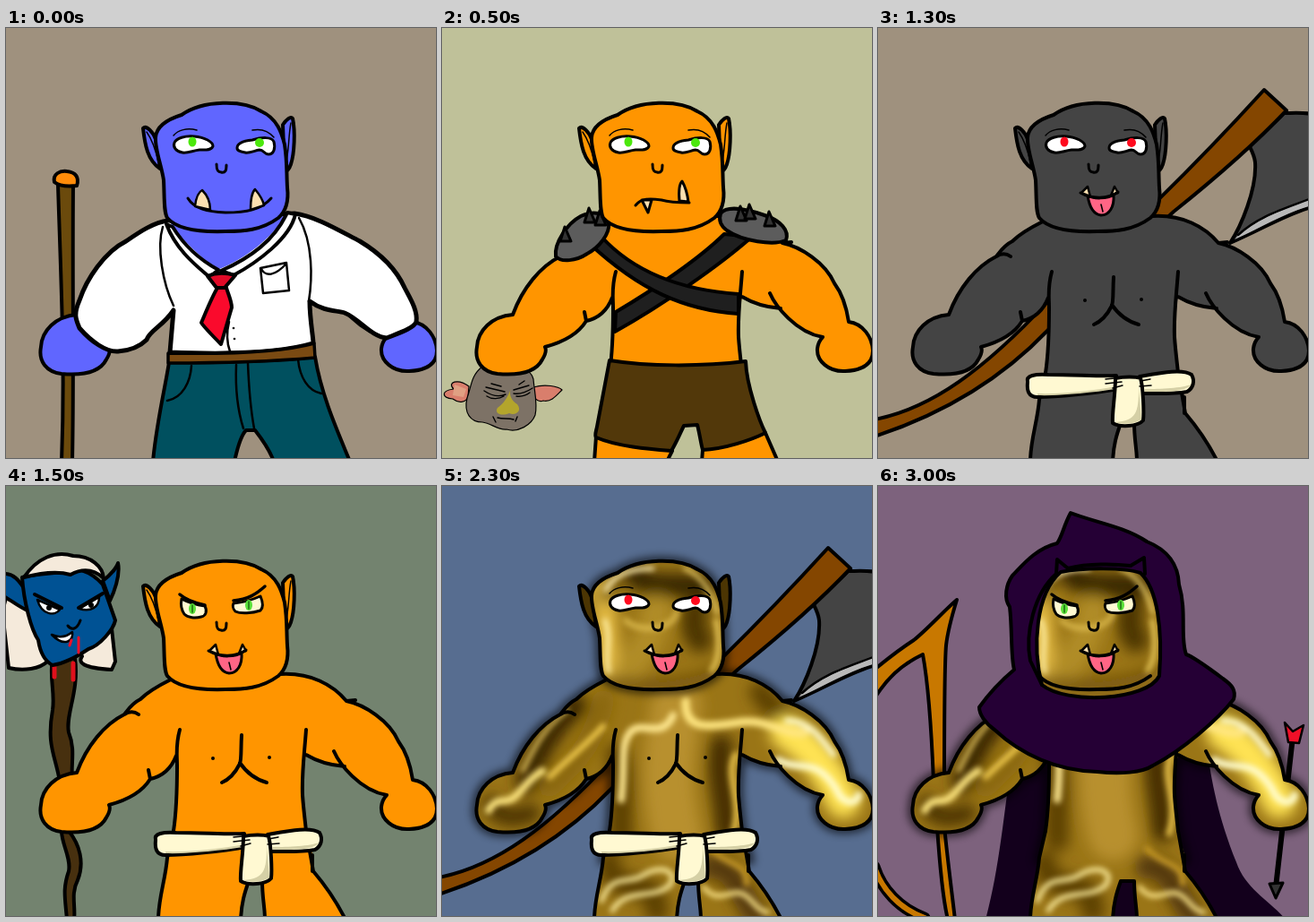
These frames come from a looping animation (480 by 480 pixels, 3.5 s). An HTML page:

```html
<!DOCTYPE html>
<html lang="en">
<head>
<meta charset="utf-8">
<title>Trolls</title>
<style>
html, body { margin: 0; width: 100%; height: 100%; overflow: hidden; }
svg { display: block; width: 100vw; height: 100vh; }
path, ellipse { stroke-linejoin: round; stroke-linecap: round; }
</style>
</head>
<body>
<svg id="stage" viewBox="0 0 480 480"></svg>
<script>
const INK = '#000', CREAM = '#fff9d2', BONE = '#fce0b0';
const shape = (d, fill, w = 4) => `<path d="${d}" fill="${fill}" stroke="${INK}" stroke-width="${w}"/>`;
const plain = (d, fill) => `<path d="${d}" fill="${fill}"/>`;
const line = (d, w = 4, color = INK) => `<path d="${d}" fill="none" stroke="${color}" stroke-width="${w}"/>`;
const dot = (x, y, rx, ry, fill) => `<ellipse cx="${x}" cy="${y}" rx="${rx}" ry="${ry}" fill="${fill}"/>`;

// Body outlines
const HEAD = 'M196 97C220 80 265 80 285 93C303 101 308 118 311 130C314 150 313 160 314 178C316 195 312 205 304 212C285 226 265 227 245 227C215 228 190 224 180 212C176 205 177 190 176 170C174 155 166 135 167 122C168 110 180 102 196 97Z';
const EARS = 'M172 157C158 148 155 130 153 112C157 108 165 117 168 126ZM309 108C313 102 318 98 320 101C323 115 322 140 318 152C316 158 313 160 311 160Z';
const ARM_L = 'M184 216C168 224 158 230 150 238C140 243 136 250 132 255C110 266 90 290 79 320C55 322 40 338 39 356C36 372 45 384 62 386C85 388 105 384 112 370C117 362 116 358 115 356C130 352 150 345 161 327C175 324 185 314 190 301';
const ARM_R = '425 345C424 346 420 350 419 358C418 372 432 384 450 383C470 382 481 375 481 360C480 345 470 330 454 328C452 315 447 297 438 285C428 262 400 244 380 240C365 222 340 208 306 210';
const SIDE_L = 'C189 340 190 365 187 385L179 418';
const BODY = ARM_L + SIDE_L + 'L344 418L335 385C334 375 332 360 331 345C330 325 333 310 335 300C350 309 365 312 378 313C395 335 408 342 ' + ARM_R + 'Z';
const LEGS = 'M187 385L180 415C178 440 170 460 170 484H262C263 465 266 455 271 441H286C286 460 289 470 289 484H379C372 470 360 450 343 430L335 385Z';
const FOLDS = ARM_L
  + 'M194 272C189 290 191 300 191 312C191 340 190 365 187 385'
  + 'M161 327L159 317M335 272C333 300 330 320 331 345C332 360 334 375 335 385'
  + 'M335 300C350 309 365 312 378 313M366 296C372 310 395 340 ' + ARM_R
  + 'M380 240L390 239M132 255C138 251 144 252 148 255';

// Gold surface: blurred streaks as [path, color, width]
const streaks = (list, blur) => `<g filter="url(#blur${blur})">${list.map(([d, c, w]) => line(d, w, c)).join('')}</g>`;
const GOLD_HEAD = streaks([
  ['M175 112C190 150 180 190 190 212', '#e6bd45', 24],
  ['M215 98C230 118 265 108 292 112', '#382600', 26],
  ['M192 105L180 125', '#4a3300', 12],
  ['M283 138C279 150 280 162 288 172', '#4b3505', 28],
  ['M240 138C235 170 220 190 210 200', '#b08c28', 34],
  ['M185 216C220 226 270 224 306 208', '#6d4d08', 12]], 8)
  + streaks([
  ['M183 116C192 98 212 92 235 92', '#ffeeb0', 5],
  ['M271 92C290 100 302 120 307 142', '#f5d870', 4],
  ['M182 150C190 170 181 190 186 207', '#fff0a8', 5],
  ['M306 150C311 175 309 195 301 206', '#f0d060', 5],
  ['M205 150C220 165 260 160 262 140', '#d9b74b', 6]], 3);
const GOLD_BODY = streaks([
  ['M150 245C120 270 105 300 95 330', '#3a2700', 26],
  ['M180 240C170 280 160 300 120 335', '#8a6810', 24],
  ['M195 300C205 325 198 350 200 395', '#5b4006', 26],
  ['M262 245C250 310 250 340 262 390', '#b8902e', 56],
  ['M312 290C306 325 318 350 318 385', '#442f02', 26],
  ['M355 230C375 260 400 265 415 285', '#5c4105', 24],
  ['M385 275C410 290 430 315 448 352', '#ffe352', 38],
  ['M55 355C65 375 85 370 100 365', '#4a3300', 20],
  ['M185 420C200 470 235 425 240 475', '#5b3f04', 26],
  ['M300 425C330 425 330 455 350 478', '#53390a', 26]], 8)
  + streaks([
  ['M140 250C112 272 104 290 90 318', '#f2d469', 4],
  ['M120 325C140 305 160 290 180 268', '#f5cf4f', 6],
  ['M52 362C62 345 70 356 80 348C92 338 95 328 112 318', '#ffe780', 8],
  ['M200 350C205 310 198 290 210 275C222 260 245 285 258 256', '#ffe890', 8],
  ['M272 240C270 275 300 268 330 264C360 258 380 278 405 276', '#ffe680', 9],
  ['M385 262C412 262 425 285 437 300', '#fffbd0', 6],
  ['M375 306C400 320 415 300 440 338C446 354 462 358 465 345', '#fffccc', 8],
  ['M328 300C315 325 338 350 325 388', '#e8c148', 7],
  ['M178 463C190 430 210 446 225 434C245 422 265 430 254 446C235 462 205 448 190 474', '#fff0a0', 5],
  ['M292 448C310 470 325 445 340 458C350 466 352 474 364 476', '#ffe98c', 5],
  ['M300 405C320 425 342 420 340 444', '#c99b28', 6]], 3);
const gilded = (d, clip, streaksIn) =>
  `<g clip-path="url(#${clip})">${plain(d, '#9a7516')}${streaksIn}</g>`;
const halo = d => `<g filter="url(#blur5)" opacity=".65">${line(d, 10)}</g>`;

// Figures
const torso = skin => plain(BODY, skin) + line(FOLDS);
const head = skin => shape(EARS, skin) + shape(HEAD, skin)
  + line('M157 116C164 126 168 140 170 150M318 106C315 122 316 140 312 152', 1.5);
const legLines = line('M187 385L180 415C178 440 170 460 170 484M262 484C263 465 266 455 271 441H286C286 460 289 470 289 484M335 385L343 430C360 450 372 470 379 484M342 430V412');
const bare = skin => plain(LEGS, skin) + torso(skin) + legLines;
const chest = line('M263 278C262 295 263 305 261 310C256 320 248 328 241 331M261 309C270 322 280 328 291 331')
  + dot(231, 304, 2, 2, INK) + dot(294, 303, 2, 2, INK);
const goldBody = halo(BODY) + gilded(LEGS + BODY, 'bodyClip', GOLD_BODY) + line(FOLDS) + legLines;
const goldHead = halo(HEAD) + shape(EARS, '#4c3503') + gilded(HEAD, 'headClip', GOLD_HEAD) + line(HEAD);

// Faces
const nose = line('M235 152C235 158 236 161 240 161C245 162 246 159 246 153', 3);
const slyEyes = iris => shape('M188 128C190 123 200 120 210 121C222 122 231 127 231 132C229 137 222 136 216 136C208 137 203 140 197 139C190 138 186 133 188 128Z', '#fff', 3)
  + shape('M258 134C258 128 265 126 275 125C285 122 297 121 299 127C301 134 299 141 293 141C288 141 288 136 283 136C277 137 272 140 267 139C261 138 258 137 258 134Z', '#fff', 3)
  + dot(208, 127, 4.5, 5.5, iris) + dot(283, 128, 5, 5, iris)
  + line('M187 120C192 114 202 111 213 114M275 114C285 112 293 115 299 122', 1.5);
const angryEyes = shape('M196 126C205 131 214 133 222 134C225 140 223 145 218 146C211 148 203 147 199 143C195 137 195 131 196 126Z', CREAM, 3)
  + shape('M254 131C265 130 275 127 284 123C287 130 287 136 284 139C275 142 262 143 256 140C253 137 253 133 254 131Z', CREAM, 3)
  + dot(208, 137, 4, 6, '#5be03a') + dot(271, 133, 4, 6, '#5be03a')
  + line('M208 133V141M271 129V137', 1.5, '#1d6b10')
  + line('M194 121C202 128 213 131 222 133M254 128C270 127 280 120 289 112', 3.5);
const tuskMouth = line('M203 190C210 202 225 205 245 206C268 206 285 203 296 190', 3)
  + shape('M211 199C212 190 215 183 219 181C224 186 228 193 228 203Z', BONE, 2.5)
  + shape('M273 203C273 192 275 183 278 180C283 186 287 192 288 198Z', BONE, 2.5);
const sneer = line('M216 198C222 190 232 190 245 192C255 195 265 195 276 195', 3)
  + shape('M223 192L230 206L234 192Z', BONE, 3)
  + shape('M265 193C264 182 265 174 268 171C272 178 274 186 275 194Z', BONE, 3);
const tongueMouth = shape('M234 187C240 191 256 191 263 186C264 200 258 209 249 209C240 208 236 200 234 187Z', '#ff6585', 3)
  + line('M249 197L251 205', 1.5)
  + shape('M227 184L234 177L237 188Z', BONE, 2.5) + shape('M260 187L264 177L268 184Z', BONE, 2.5)
  + line('M226 184C238 191 257 191 268 183', 3);

// Clothes
const suit = pants =>
  shape('M182 373C178 400 168 440 164 484H255C258 470 262 455 268 449H278C285 458 294 470 299 484H384C370 450 352 410 345 367C300 372 230 374 182 373Z', pants)
  + line('M257 376C256 400 258 425 265 447M270 374C271 400 273 425 277 447M207 377C206 395 197 413 180 416M326 370C328 390 337 405 352 408', 2.5)
  + shape('M181 215C165 217 150 227 134 238C110 250 90 280 82 304C75 320 78 325 82 335C95 350 112 362 125 361C140 360 150 355 157 348C160 338 175 333 187 315L183 362C230 364 300 365 343 352C343 345 339 325 339 305C355 317 370 315 378 318C395 325 408 345 425 346C440 340 455 335 458 328C460 315 450 300 445 290C435 268 415 250 395 238C370 225 345 210 322 207Z', '#fff', 5)
  + shape('M181 363C230 364 300 364 344 352L345 368C300 372 230 374 181 374Z', '#7a4a12', 3.5)
  + line('M175 222C168 245 175 285 187 310M327 212C343 240 342 280 338 305', 2.5);
const collar = skin => plain('M184 218L186 222C200 240 220 258 236 270C270 256 295 235 312 210Z', skin)
  + shape('M179 219C190 248 212 265 227 278L237 270C215 258 197 240 186 222Z', '#fff')
  + shape('M314 206L323 208C317 235 280 262 254 276L240 271C270 258 298 238 312 210Z', '#fff')
  + line('M249 328C246 340 246 350 250 361', 2.5) + dot(254, 335, 1.3, 1.3, INK) + dot(255, 347, 1.3, 1.3, INK)
  + shape('M236 290L246 290C248 297 252 305 252 312L240 353C232 345 222 335 218 329C224 315 230 300 236 290Z', '#fa0a2c')
  + shape('M225 277C234 273 245 273 256 276L244 290L235 290Z', '#e00a28')
  + line('M284 268L313 262L316 293L287 296ZM285 269C290 278 300 277 313 263', 2.5);
const cloth = shape('M167 395C165 388 175 386 190 387C220 387 250 389 266 388L268 403C240 408 200 412 178 412C168 412 166 405 167 395Z', CREAM)
  + shape('M292 389C315 385 340 380 350 387C354 394 352 402 345 406C330 409 310 408 294 408Z', CREAM)
  + plain('M178 408C205 409 240 405 265 400V403C240 407 200 411 178 410ZM298 403C315 403 340 402 349 398C345 407 315 406 298 406Z', '#d5d0a6')
  + shape('M265 391C275 389 288 389 293 391C296 400 297 430 296 438C290 445 270 446 262 441C261 430 265 410 265 391Z', CREAM)
  + plain('M291 402L294 437C288 442 272 443 265 440C288 438 291 430 291 402Z', '#d5d0a6')
  + line('M254 392L274 390M254 397L272 395M262 402L273 399M293 394L304 392M292 400L305 399', 1.5);
const shorts = skin => plain('M172 452L170 484H251L257 470ZM291 468L290 484H375L361 450Z', skin)
  + line('M172 456L170 484M257 472L251 484M291 471L290 484M361 452L375 484')
  + shape('M187 371L173 445C172 450 170 455 172 457C195 467 230 470 256 472C262 462 266 452 270 444L285 443C288 455 289 464 291 471C315 470 345 460 361 452C355 440 340 400 339 372C290 378 230 378 187 371Z', '#52380a');
const spike = (x, y) => shape(`M${x - 5} ${y + 16}L${x} ${y}L${x + 7} ${y + 16}Z`, '#333', 3);
const armour = shape('M315 230L346 233C310 265 245 310 193 339L194 317C240 290 290 255 315 230Z', '#1f1f1f')
  + shape('M165 241L178 233C210 268 260 292 331 297V319C270 315 220 292 165 241Z', '#1f1f1f')
  + shape('M127 255C125 240 140 218 155 210C170 203 185 207 186 217C188 230 175 245 162 252C150 260 133 262 127 255Z', '#5c5c5c')
  + shape('M311 207C318 198 340 202 360 209C378 215 388 226 384 237C370 243 335 238 318 226C310 220 309 213 311 207Z', '#5c5c5c')
  + spike(137, 222) + spike(164, 201) + spike(176, 204)
  + spike(333, 199) + spike(343, 197) + spike(365, 205);

// Things held
const staff = shape('M58 175H75C74 280 76 390 74 484H62C66 380 62 300 58 175Z', '#6b4a0c')
  + shape('M54 172C52 163 60 159 68 160C78 161 82 167 79 176C70 177 60 177 54 172Z', '#ff8c0a');
const axe = shape('M453 95C462 95 475 94 484 96V200C455 208 430 224 393 240C405 222 423 180 421 150C420 140 414 132 413 128C430 115 445 105 453 95Z', '#444')
  + plain('M398 236C420 213 450 204 484 190V198C450 208 430 222 398 236Z', '#b9b9b9')
  + line('M402 231C425 210 450 203 484 190', 2.5)
  + shape('M431 69L456 92C420 130 380 165 330 205L190 337C130 400 60 435 -4 456V437C60 425 120 380 190 305C300 210 380 125 431 69Z', '#844600');
const goblin = shape('M30 400C18 391 5 395 13 403C-2 405 0 413 12 414C20 420 27 417 29 412ZM102 401C115 397 130 400 134 404C128 410 122 418 113 416C108 418 104 414 103 412Z', '#d97e6c', 1.2)
  + plain('M14 398L27 403L24 412L12 410Z', '#e0a083')
  + shape('M45 378C32 388 33 400 28 413C24 430 32 440 45 440C55 441 62 449 72 448C85 452 100 443 104 432C107 420 103 405 102 392C98 376 70 372 45 378Z', '#7d7266', 1.2)
  + plain('M77 402C74 410 78 416 84 420C90 428 82 433 75 430C66 434 58 430 62 424C68 420 74 412 77 402Z', '#b3a52c')
  + line('M47 405C56 411 64 412 71 409M49 401L70 406M50 411C56 415 64 414 69 411M80 408C88 409 95 406 101 402M80 404L97 399M83 411C90 412 94 410 98 407M62 435C68 437 74 435 80 437M57 434L60 440M84 434L82 439M55 397L66 400M86 398L92 394', 1.4);
const trophy = shape('M52 190L77 192C82 230 66 255 70 275C78 295 72 310 74 330L70 385C82 400 88 420 80 440C72 455 78 470 76 484H68C66 460 63 450 70 430C73 415 62 400 62 385L60 330C55 300 45 290 52 250C55 230 48 215 52 190Z', '#47300f')
  + line('M54 200V213M75 198V216', 5, '#e0101c')
  + shape('M20 110L0 125L-4 140L3 203C20 207 38 204 46 196L60 150L85 190C80 197 85 203 118 205L122 196L117 150L100 110Z', '#f5eadb')
  + shape('M-4 98C8 97 14 104 24 120L26 140C16 136 6 128 -4 122ZM108 106C118 98 124 90 125 86C128 100 120 120 116 128Z', '#005294')
  + shape('M18 102C30 98 50 98 62 96C75 88 95 95 108 110L122 150C120 160 105 178 92 182C80 190 65 198 52 200C42 195 38 185 36 172C28 160 20 130 18 102Z', '#005294')
  + shape('M20 102C35 80 55 72 75 78C95 78 108 90 109 103C98 93 85 92 72 99C55 94 35 98 20 102Z', '#f5eadb')
  + shape('M35 127L60 138C55 145 40 145 35 127ZM82 137L104 124C104 135 95 141 82 137Z', '#fff', 2.5)
  + dot(48, 136, 3, 3, INK) + dot(95, 133, 3, 3, INK)
  + line('M32 121L62 136M81 136L108 120')
  + line('M69 156C73 161 79 161 83 150', 3)
  + shape('M51 166C60 170 68 168 74 163C76 172 66 181 51 166Z', '#fff', 2.5)
  + line('M73 172L71 178M81 169V186', 3, '#f01028');
const bow = line('M-4 425C4 450 24 472 52 482', 13) + line('M-4 425C4 450 24 472 52 482', 6, '#c87800')
  + line('M-4 234C4 217 18 206 34 197', 4)
  + shape('M88 127C75 138 55 160 40 172C20 185 8 195 -4 205V237C10 215 25 200 50 188C56 220 60 280 62 330H74C74 250 75 190 76 178C78 160 84 140 88 127Z', '#c87800')
  + shape('M66 380H74C78 420 82 450 86 484H78C72 460 68 410 66 380Z', '#c87800');
const arrow = line('M463 280L444 448', 6) + shape('M437 444L452 443L444 460Z', '#333', 3)
  + shape('M454 264L463 274L475 267L470 287L458 286Z', '#f01028', 2.5);

// Hooded cloak
const cape = plain('M150 300C140 370 135 430 120 484H455C440 465 410 450 400 420C380 370 372 330 367 290Z', '#13001c');
const OPENING = 'M183 222C172 180 176 120 204 96C230 91 275 91 293 97C312 115 318 160 314 212C300 240 210 244 183 222Z';
const hood = shape('M215 30C207 45 206 55 200 64C175 70 160 90 150 100C143 110 140 125 147 135C150 160 148 190 152 205C140 215 125 230 113 247C113 255 120 265 130 272C160 300 200 318 245 319C270 322 295 320 307 312C340 295 380 260 397 238C400 228 395 222 385 215C365 200 350 190 344 188C337 170 345 140 336 110C335 85 320 70 300 62C275 45 240 40 215 30Z', '#250035')
  + line('M200 82L199 98C174 120 164 165 170 195L183 222M200 82L212 92C235 86 265 87 282 89L297 80L298 98')
  + `<g clip-path="url(#hoodClip)">${plain(OPENING, '#8d6a18')}${gilded(HEAD, 'headClip', GOLD_HEAD)}${line('M180 212C190 224 215 228 245 227C265 227 285 226 304 212')}</g>`
  + line(OPENING);

const suited = (skin, pants, prop) => prop + torso(skin) + suit(pants) + collar(skin) + head(skin) + slyEyes('#4be80c') + nose + tuskMouth;
const scenes = [
  ['#9f917e', suited('#6066ff', '#00505f', staff)],
  ['#bfc199', goblin + torso('#ff9500') + shorts('#ff9500') + armour + head('#ff9500') + slyEyes('#4be80c') + nose + sneer],
  ['#9f917e', axe + bare('#444') + chest + cloth + head('#444') + slyEyes('#ff0a1e') + nose + tongueMouth],
  ['#73836f', trophy + bare('#ff9500') + chest + cloth + head('#ff9500') + angryEyes + nose + tongueMouth],
  ['#576d90', axe + goldBody + chest + cloth + goldHead + slyEyes('#ff0a1e') + nose + tongueMouth],
  ['#b5692b', suited('#ff6268', '#03546a', goblin)],
  ['#7d627d', cape + bow + arrow + goldBody + hood + angryEyes + nose + tongueMouth]
];

const clip = (id, d) => `<clipPath id="${id}"><path d="${d}"/></clipPath>`;
const blur = n => `<filter id="blur${n}" filterUnits="userSpaceOnUse" x="-40" y="-40" width="560" height="560"><feGaussianBlur stdDeviation="${n}"/></filter>`;
const stage = document.getElementById('stage');
stage.innerHTML = `<defs>${clip('bodyClip', LEGS + BODY)}${clip('headClip', HEAD)}${clip('hoodClip', OPENING)}${[3, 5, 8].map(blur).join('')}</defs>`
  + scenes.map(([bg, art]) => `<g class="scene" display="none"><rect width="480" height="480" fill="${bg}"/>${art}</g>`).join('');

const groups = [...stage.querySelectorAll('.scene')];
const HOLD = 500;
let shown = -1;
function update(ms) {
  const i = Math.floor(ms / HOLD) % groups.length;
  if (i === shown) return;
  groups.forEach((g, k) => g.setAttribute('display', k === i ? 'inline' : 'none'));
  shown = i;
}
const start = performance.now();
function tick() {
  update(performance.now() - start);
  requestAnimationFrame(tick);
}
tick();
</script>
</body>
</html>
```
